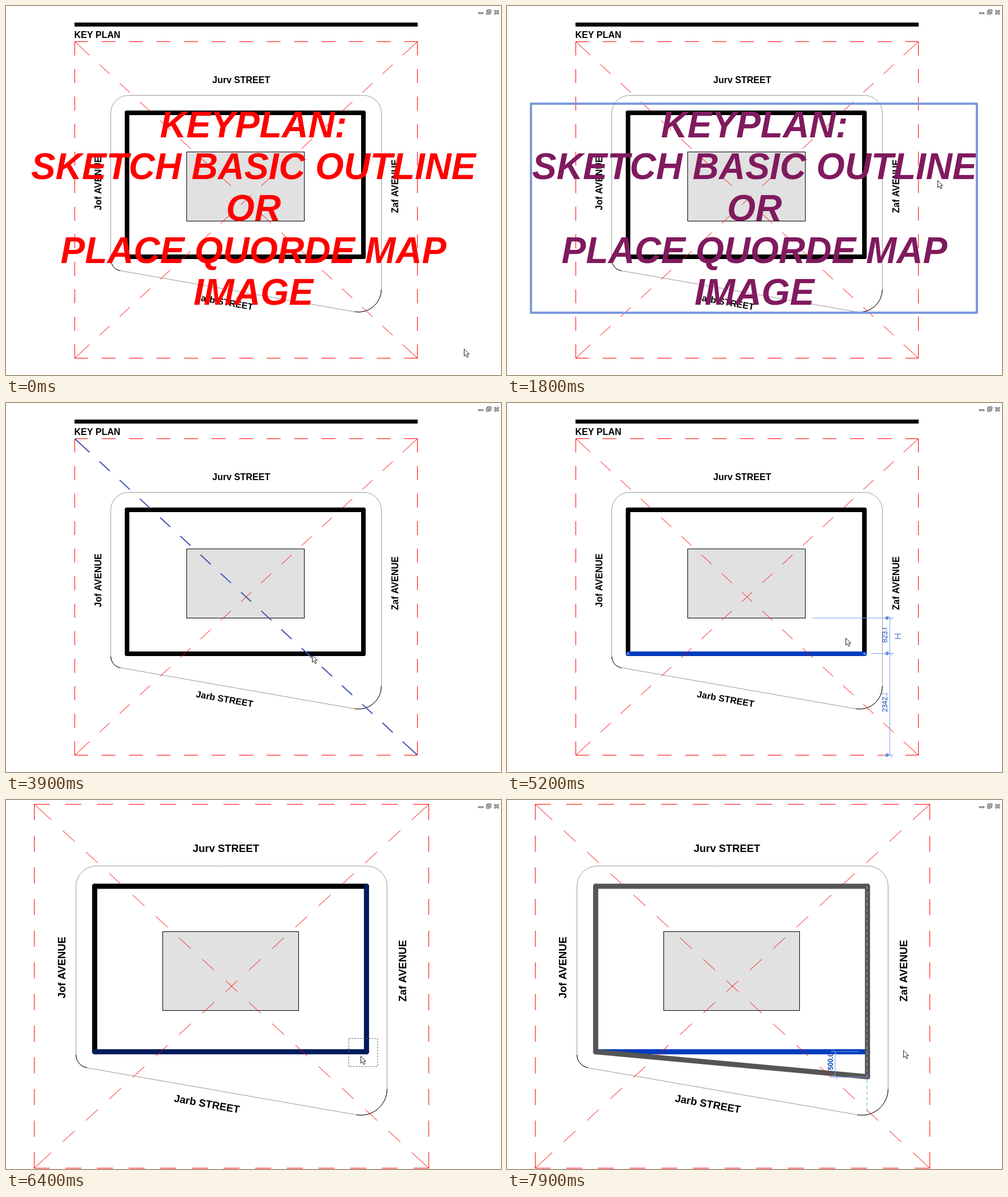
Write an HTML page with a canvas that moves like this. It is 867 px wide and 646 px high and loops after 8000 ms.

```html
<!DOCTYPE html>
<html lang="en">
<head>
<meta charset="utf-8">
<title>Key plan</title>
<style>
html, body { margin: 0; height: 100%; overflow: hidden; background: #fff; }
canvas { display: block; }
</style>
</head>
<body>
<canvas id="stage" width="867" height="646"></canvas>
<script>
const ctx = document.getElementById('stage').getContext('2d');
const LOOP = 8000, STEP = 100;
const FONT = '"Liberation Sans", Arial, sans-serif';
const RED = '#f00', SELECT = '#003cbe', HOVER = '#001c5c', DIM = '#78a0f0', GHOST = '#555';
const NOTE = ['KEYPLAN:', 'SKETCH BASIC OUTLINE', 'OR', 'PLACE QUORDE MAP', 'IMAGE'];

// Pointer path: time, x, y
const POINTER = [
  [200, 801.5, 600], [700, 780, 474], [900, 780, 474], [1200, 773, 440],
  [1300, 773, 440], [1800, 754, 305], [2100, 754, 305], [2700, 749, 320],
  [3000, 492, 428], [3100, 492, 432], [3300, 492, 432], [3400, 487, 436],
  [3500, 487, 436], [3900, 536, 441], [4400, 560, 437], [5200, 593, 411],
  [5300, 594, 422], [5800, 651, 467], [5900, 651, 467], [6300, 600, 417],
  [6400, 621, 448], [6800, 630, 442], [6900, 629, 441], [7100, 629, 441],
  [7600, 632, 485], [7900, 694, 438]
];

// Views of the plan: scale and offset
const FULL = { s: 1, x: 0, y: 0 };
const CLOSE = { s: 1.248, x: -136.9, y: -74.5 };
const MIDDLE = { s: 1.15, x: -88.5, y: -64 };
let view = FULL;

// Plan to stage; X and Y snap to pixel centres for crisp hairlines.
const mapX = x => view.x + view.s * x;
const mapY = y => view.y + view.s * y;
const X = x => Math.floor(mapX(x)) + .5;
const Y = y => Math.floor(mapY(y)) + .5;
const within = (t, a, b) => t >= a && t < b;

function pointerAt(t) {
  const i = POINTER.findIndex(p => p[0] >= t);
  if (i === 0) return POINTER[0].slice(1);
  if (i < 0) return POINTER[POINTER.length - 1].slice(1);
  const [t0, x0, y0] = POINTER[i - 1], [t1, x1, y1] = POINTER[i];
  const k = (t - t0) / (t1 - t0);
  return [x0 + (x1 - x0) * k, y0 + (y1 - y0) * k];
}

function stroke(color, width, points, dash = []) {
  ctx.strokeStyle = color;
  ctx.lineWidth = width;
  ctx.setLineDash(dash);
  ctx.beginPath();
  points.forEach(p => ctx.lineTo(...p));
  ctx.stroke();
  ctx.setLineDash([]);
}

function dot(x, y, r = 3) {
  ctx.beginPath();
  ctx.arc(x, y, r, 0, 7);
  ctx.fillStyle = '#7f97cc';
  ctx.fill();
  ctx.lineWidth = 1;
  ctx.strokeStyle = '#4a6fb8';
  ctx.stroke();
}

// Dashes are centred; both end dashes take up the remainder.
function dashed(x0, y0, x1, y1, color = RED, width = 1) {
  const on = 24.5 * view.s, off = 23.7 * view.s;
  const a = [X(x0), Y(y0)], b = [X(x1), Y(y1)];
  const length = Math.hypot(b[0] - a[0], b[1] - a[1]);
  const n = Math.floor((length + off) / (on + off) + .15);
  const pad = (length - n * on - (n - 1) * off) / 2;
  const pattern = [on + pad, off];
  for (let i = 2; i < n; i++) pattern.push(on, off);
  pattern.push(on + pad + 5, 0);
  stroke(color, width, [a, b], pattern);
}

function label(text, x, y, degrees = 0, dy = 0, align = 'left') {
  ctx.save();
  ctx.translate(mapX(x), mapY(y));
  ctx.rotate(degrees * Math.PI / 180);
  ctx.font = `bold ${16 * view.s}px ${FONT}`;
  ctx.textAlign = align;
  ctx.fillStyle = '#000';
  ctx.fillText(text, 0, dy * view.s);
  ctx.restore();
}

function curb() {
  const left = X(183.5), top = Y(156.5), right = X(657.5), s = view.s;
  const low = Y(543), high = Y(460);
  ctx.strokeStyle = '#999';
  ctx.lineWidth = 1;
  ctx.beginPath();
  ctx.moveTo(X(400), top);
  ctx.arcTo(right, top, right, low, 31 * s);
  ctx.arcTo(right, low, left, high, 40 * s);
  ctx.arcTo(left, high, left, top, 20 * s);
  ctx.arcTo(left, top, right, top, 31 * s);
  ctx.closePath();
  ctx.stroke();
  ctx.strokeStyle = '#000';
  ctx.beginPath();
  ctx.moveTo(right, Y(495));
  ctx.arcTo(right, low, left, high, 40 * s);
  ctx.moveTo(X(200), Y(463));
  ctx.arcTo(left, high, left, top, 20 * s);
  ctx.stroke();
}

function walls({ top, left, right, bottom, drop = 0 }) {
  const l = mapX(212), r = mapX(626), t = mapY(187), b = mapY(439);
  const w = Math.floor(8 * view.s), end = b + drop;
  ctx.lineCap = 'round';
  if (drop) stroke(SELECT, w, [[l, b], [r, b]]);
  stroke(top, w, [[l, t], [r, t]]);
  stroke(left, w, [[l, t], [l, b]]);
  stroke(right, w, [[r, t], [r, end]]);
  stroke(bottom, w, [[l, b], [r, end]]);
  ctx.lineCap = 'butt';
}

function plan(wallColors, diagonalHover) {
  ctx.fillStyle = '#000';
  ctx.fillRect(mapX(120), mapY(29), 601 * view.s, 7 * view.s);
  label('KEY PLAN', 119.5, 55.5);
  label('Jurv STREET', 412, 135, 0, 0, 'center');
  label('Jof AVENUE', 167, 357.5, -90);
  label('Zaf AVENUE', 686.5, 362.5, -90);
  label('Jarb STREET', 383, 518, 10, 5.7, 'center');
  curb();
  const x = X(316), y = Y(255.7), width = X(522.5) - x, height = Y(376.5) - y;
  ctx.fillStyle = '#e1e1e1';
  ctx.fillRect(x, y, width, height);
  ctx.strokeStyle = '#000';
  ctx.lineWidth = 1;
  ctx.strokeRect(x, y, width, height);
  walls(wallColors);
  const l = 120, t = 62.5, r = 720.5, b = 616.5;
  dashed(l, t, r, t);
  dashed(l, b, r, b);
  dashed(l, t, l, b);
  dashed(r, t, r, b);
  dashed(l, b, r, t);
  dashed(l, t, r, b, diagonalHover ? '#4355b4' : RED, diagonalHover ? 2 : 1);
}

function note(selected, hovered) {
  ctx.font = `italic bold 64px ${FONT}`;
  ctx.fontKerning = 'none';
  ctx.textAlign = 'center';
  ctx.fillStyle = selected ? SELECT : hovered ? '#801a5e' : RED;
  NOTE.forEach((line, i) => ctx.fillText(line, 433.4, 229.8 + i * 73.3));
  ctx.fontKerning = 'auto';
  if (!selected && !hovered) return;
  ctx.lineJoin = 'round';
  ctx.strokeStyle = '#7b9bdc';
  ctx.lineWidth = selected ? 1 : 4;
  ctx.strokeRect(42, 171, 781, 366);
  ctx.lineJoin = 'miter';
  if (!selected) return;
  dot(41.5, 354);
  dot(823.5, 354);
  stroke(SELECT, 1, [[35, 170.5], [47, 170.5]]);
  stroke(SELECT, 1, [[41.5, 164], [41.5, 177]]);
}

// Vertical dimension text whose last digit is cut off
function dimText(text, x, y, length, weight = '') {
  ctx.save();
  ctx.translate(x, y);
  ctx.rotate(-Math.PI / 2);
  ctx.beginPath();
  ctx.rect(0, -12, length, 15);
  ctx.clip();
  ctx.font = `${weight} 12px ${FONT}`;
  ctx.textAlign = 'left';
  ctx.fillStyle = '#0a45b4';
  ctx.fillText(text, 0, 0);
  ctx.restore();
}

function tick(x, y) {
  stroke(DIM, 1, [[x - 4, y - 4], [x + 4, y + 4]]);
}

function wallDimensions() {
  stroke(DIM, 1, [[670.5, 376], [670.5, 617]]);
  [[376.5, 535], [438.5, 638], [616.5, 660]].forEach(([y, from]) => {
    stroke(DIM, 1, [[from, y], [677, y]]);
    tick(670.5, y);
    dot(665.5, y, 2.5);
  });
  dimText('823.6', 666, 419.5, 26);
  dimText('2342.3', 666, 541, 33);
  stroke('#3c64b4', 1, [[679, 404.5], [690, 404.5]]);
  stroke('#3c64b4', 1, [[684.5, 404], [684.5, 412]]);
  stroke('#3c64b4', 1, [[679, 412.5], [690, 412.5]]);
  dot(212, 439, 2);
  dot(626, 439, 2);
}

function dragGuides(drop) {
  const base = 441, end = base + drop;
  stroke('#6eb4dc', 1, [[630.5, 150], [630.5, 549]], [6, 4]);
  stroke(DIM, 1, [[574.5, base], [574.5, end]]);
  stroke(DIM, 1, [[567, base - .5], [617, base - .5]]);
  stroke(DIM, 1, [[567, end + .5], [630, end + .5]]);
  tick(574.5, base);
  tick(574.5, end);
  dimText((drop / 43.7 * 500).toFixed(1), 571, 429 + drop, 27, 'bold');
  stroke('#b45a8c', 1, [[627, end - 4], [635, end + 4]]);
  stroke('#b45a8c', 1, [[627, end + 4], [635, end - 4]]);
}

function windowButtons() {
  ctx.strokeStyle = '#555';
  ctx.lineWidth = 1;
  ctx.strokeRect(827.5, 11.5, 8, 2);
  ctx.strokeRect(843.5, 6.5, 6, 6);
  ctx.fillStyle = '#fff';
  ctx.fillRect(841, 9, 6, 6);
  ctx.strokeRect(841.5, 8.5, 6, 6);
  ctx.strokeRect(843.5, 10.5, 2, 2);
  for (const [color, width] of [['#555', 3], ['#fff', 1]]) {
    stroke(color, width, [[855.5, 7.5], [863, 14.5]]);
    stroke(color, width, [[863, 7.5], [855.5, 14.5]]);
  }
}

const arrow = new Path2D('M.5.5V13L3.3 10.3 5.5 15 7.7 14 5.5 9.3H9.3Z');
function pointer(x, y) {
  ctx.save();
  ctx.translate(Math.round(x), Math.round(y));
  ctx.fillStyle = '#fff';
  ctx.fill(arrow);
  ctx.strokeStyle = '#222';
  ctx.lineWidth = 1;
  ctx.stroke(arrow);
  ctx.restore();
}

function draw(t) {
  const [px, py] = pointerAt(t);
  view = t < 5300 ? FULL : t < 5500 ? CLOSE : MIDDLE;
  ctx.fillStyle = '#fff';
  ctx.fillRect(0, 0, 867, 646);

  const dragging = t >= 7200;
  const drop = dragging ? 43.7 * Math.min(1, (t - 7100) / 500) : 0;
  const wallSelected = within(t, 4400, 5300);
  const cornerHover = within(t, 6200, 6500), cornerSelected = within(t, 6500, 7200);
  const base = dragging ? GHOST : '#000';
  const corner = cornerHover ? HOVER : cornerSelected ? SELECT : base;
  const wallHover = within(t, 3100, 3600) || within(t, 4200, 4400);
  const bottom = wallSelected ? SELECT : wallHover ? HOVER : corner;

  plan({ top: base, left: base, right: corner, bottom, drop }, within(t, 3700, 4200));
  if (t < 2700) note(t >= 2300, t >= 1600);
  if (wallSelected) wallDimensions();
  if (dragging) dragGuides(drop);
  if (within(t, 6000, 6500)) {
    const x = t > 6300 ? 600.5 : Math.round(px) + .5;
    const y = t > 6300 ? 417.5 : Math.round(py) + .5;
    stroke('#666', 1, [[x, y], [651, y], [651, 466.5], [x, 466.5], [x, y]], [3, 2]);
  }
  windowButtons();
  pointer(px, py);
}

function tickFrame(now) {
  draw(Math.floor(now % LOOP / STEP) * STEP);
  requestAnimationFrame(tickFrame);
}
requestAnimationFrame(tickFrame);
</script>
</body>
</html>
```
